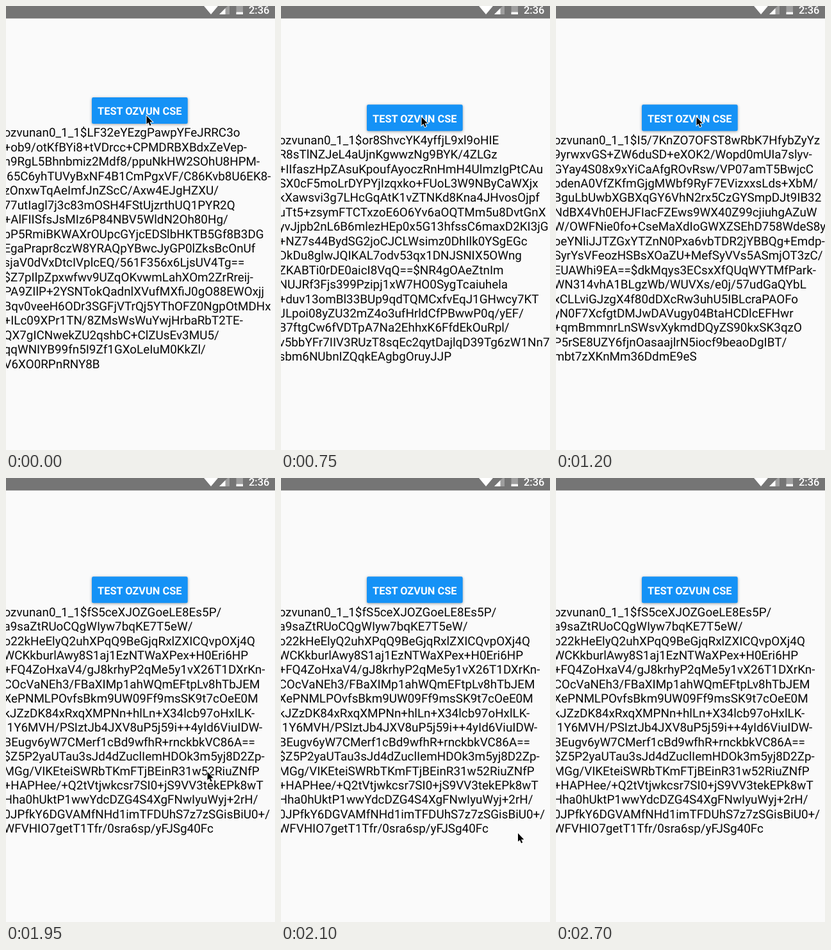
Recreate the animation shown at these times as an HTML page. Size 420x690 px, loop 3190 ms.

```html
<!DOCTYPE html>
<html lang="en">
<head>
<meta charset="utf-8">
<title>Encryption test</title>
<style>
  html, body { margin: 0; width: 100%; height: 100%; overflow: hidden; background: #fafafa; }
  svg { display: block; }
  text { font-family: Roboto, sans-serif; text-rendering: geometricPrecision; }
  #lines { font-size: 18.85px; fill: #060606; }
  .label { font-size: 16.4px; font-weight: 700; fill: #fff; text-anchor: middle; }
  .clock { font-size: 16.4px; font-weight: 500; fill: #fff; }
  .button { fill: #1592f6; filter: drop-shadow(0 1px 2px rgba(0, 0, 0, .35)); }
</style>
</head>
<body>
<svg width="420" height="690" viewBox="0 0 420 690">
  <rect width="420" height="690" fill="#fafafa"/>
  <rect width="420" height="19.4" fill="#757575"/>
  <g fill="#fff">
    <path d="M309 0H331L320 13Z"/>
    <path d="M333 13L346 0H349V13Z" opacity=".3"/>
    <path d="M333 13L342.5 3.5V13Z"/>
    <path d="M359.5 0H370V10H359.5Z" opacity=".3"/>
    <path d="M359.5 9.5H370V13H359.5Z"/>
  </g>
  <text class="clock" x="379" y="11.5">2:36</text>

  <g id="content">
    <rect class="button" x="134" y="153.3" width="149.7" height="41" rx="2.3"/>
    <rect id="ripple" x="181" y="153.3" width="75" height="41" fill="#118df0"/>
    <text class="label" x="208.8" y="180.5">TEST OZVUN CSE</text>
    <g id="lines"></g>
  </g>

  <path id="cursor" d="M.5 .5v13l2.9 -2.5l2.2 5l2.1 -.9l-2.2 -4.9h4.3Z"
        stroke="#fff" stroke-width="1.8" paint-order="stroke"/>
</svg>
<script>
const LOOP = 3190, PITCH = 22.45, BASELINE = 214.6;

const messages = [
  [0, `ozvunan0_1_1$LF32eYEzgPawpYFeJRRC3o
+ob9/otKfBYi8+tVDrcc+CPMDRBXBdxZeVep-
h9RgL5Bhnbmiz2Mdf8/ppuNkHW2SOhU8HPM-
l65C6yhTUVyBxNF4B1CmPgxVF/C86Kvb8U6EK8-
zOnxwTqAeImfJnZScC/Axw4EJgHZXU/
77utIagl7j3c83mOSH4FStUjzrthUQ1PYR2Q
+AlFIISfsJsMIz6P84NBV5WldN2Oh80Hg/
bP5RmiBKWAXrOUpcGYjcEDSlbHKTB5Gf8B3DG
EgaPrapr8czW8YRAQpYBwcJyGP0lZksBcOnUf
sjaV0dVxDtcIVplcEQ/561F356x6LjsUV4Tg==
$Z7pIlpZpxwfwv9UZqOKvwmLahXOm2ZrRreij-
PA9ZIlP+2YSNTokQadnlXVufMXfiJ0gO88EWOxjj
Bqv0veeH6ODr3SGFjVTrQj5YThOFZ0NgpOtMDHx
+ILc09XPr1TN/8ZMsWsWuYwjHrbaRbT2TE-
QX7gICNwekZU2qshbC+ClZUsEv3MU5/
qqWNIYB99fn5I9Zf1GXoLeIuM0KkZl/
V6XO0RPnRNY8B`],
  [300, `ozvunan0_1_1$or8ShvcYK4yffjL9xl9oHIE
R8sTlNZJeL4aUjnKgwwzNg9BYK/4ZLGz
+IIfaszHpZAsuKpoufAyoczRnHmH4UlmzIgPtCAu
SX0cF5moLrDYPYjIzqxko+FUoL3W9NByCaWXjx
kXawsvi3g7LHcGqAtK1vZTNKd8Kna4JHvosOjpf
uTt5+zsymFTCTxzoE6O6Yv6aOQTMm5u8DvtGnX
yvJjpb2nL6B6mlezHEp0x5G13hfssC6maxD2KI3jG
+NZ7s44BydSG2joCJCLWsimz0DhIlk0YSgEGc
DkDu8glwJQIKAL7odv53qx1DNJSNIX5OWng
ZKABTi0rDE0aicI8VqQ==$NR4gOAeZtnIm
NUJRf3Fjs399Pzipj1xW7HO0SygTcaiuhela
+duv13omBl33BUp9qdTQMCxfvEqJ1GHwcy7KT
JLpoi08yZU32mZ4o3ufHrldCfPBwwP0q/yEF/
B7ftgCw6fVDTpA7Na2EhhxK6FfdEkOuRpl/
v5bbYFr7IIV3RUzT8sqEc2qytDajlqD39Tg6zW1Nn7
sbm6NUbnIZQqkEAgbgOruyJJP`],
  [1200, `ozvunan0_1_1$I5/7KnZO7OFST8wRbK7HfybZyYz
9yrwxvGS+ZW6duSD+eXOK2/Wopd0mUIa7slyv-
GYay4S08x9xYiCaAfgROvRsw/VP07amT5BwjcC
odenA0VfZKfmGjgMWbf9RyF7EVizxxsLds+XbM/
BguLbUwbXGBXqGY6VhN2rx5CzGYSmpDJt9IB32
NdBX4Vh0EHJFIacFZEws9WX40Z99cjiuhgAZuW
W/OWFNie0fo+CseMaXdIoGWXZSEhD758WdeS8y
oeYNliJJTZGxYTZnN0Pxa6vbTDR2jYBBQg+Emdp-
SyrYsVFeozHSBsXOaZU+MefSyVVs5ASmjOT3zC/
EUAWhi9EA==$dkMqys3ECsxXfQUqWYTMfPark-
WN314vhA1BLgzWb/WUVXs/e0j/57udGaQYbL
xCLLviGJzgX4f80dDXcRw3uhU5IBLcraPAOFo
yN0F7XcfgtDMJwDAVugy04BtaHCDlcEFHwr
+qmBmmnrLnSWsvXykmdDQyZS90kxSK3qzO
P5rSE8UZY6fjnOasaajlrN5iocf9beaoDgIBT/
mbt7zXKnMm36DdmE9eS`],
  [1800, `ozvunan0_1_1$fS5ceXJOZGoeLE8Es5P/
a9saZtRUoCQgWIyw7bqKE7T5eW/
o22kHeElyQ2uhXPqQ9BeGjqRxlZXICQvpOXj4Q
WCKkburlAwy8S1aj1EzNTWaXPex+H0Eri6HP
+FQ4ZoHxaV4/gJ8krhyP2qMe5y1vX26T1DXrKn-
COcVaNEh3/FBaXIMp1ahWQmEFtpLv8hTbJEM
XePNMLPOvfsBkm9UW09Ff9msSK9t7cOeE0M
kJZzDK84xRxqXMPNn+hlLn+X34lcb97oHxlLK-
I1Y6MVH/PSIztJb4JXV8uP5j59i++4yId6ViuIDW-
BEugv6yW7CMerf1cBd9wfhR+rnckbkVC86A==
$Z5P2yaUTau3sJd4dZuclIemHDOk3m5yj8D2Zp-
MGg/VIKEteiSWRbTKmFTjBEinR31w52RiuZNfP
+HAPHee/+Q2tVtjwkcsr7SI0+jS9VV3tekEPk8wT
Hha0hUktP1wwYdcDZG4S4XgFNwIyuWyj+2rH/
0JPfkY6DGVAMfNHd1imTFDUhS7z7zSGisBiU0+/
WFVHIO7getT1Tfr/0sra6sp/yFJSg40Fc`]
];

// start time, x, y of the pointer tip
const pointer = [
  [0, 219, 170], [750, 219, 172], [1950, 314, 456], [2100, 369.5, 551.5],
  [2250, 373, 588], [2400, 391, 666], [2550, 391, 688], [2700, 391, 720]
];

const [content, lines, ripple, cursor] =
  ['content', 'lines', 'ripple', 'cursor'].map(id => document.getElementById(id));
const latest = (steps, t) => steps.findLast(step => step[0] <= t);
let shown;

function showMessage(message) {
  const rows = message.split('\n');
  lines.replaceChildren(...rows.map((row, i) => {
    const el = document.createElementNS('http://www.w3.org/2000/svg', 'text');
    el.setAttribute('x', -3.5);
    el.setAttribute('y', BASELINE + i * PITCH);
    el.textContent = row;
    return el;
  }));
  // the column stays vertically centred
  content.setAttribute('transform', `translate(0 ${(16 - rows.length) * PITCH / 2})`);
  shown = message;
}

function draw(now) {
  const t = now % LOOP;
  const message = latest(messages, t)[1];
  if (message !== shown) showMessage(message);
  const [, x, y] = latest(pointer, t);
  cursor.setAttribute('transform', `translate(${x} ${y})`);
  ripple.setAttribute('opacity', t >= 1800 && t < 1950 ? 1 : 0);
}

const start = performance.now();
function tick() {
  draw(performance.now() - start);
  requestAnimationFrame(tick);
}
tick();
</script>
</body>
</html>
```
